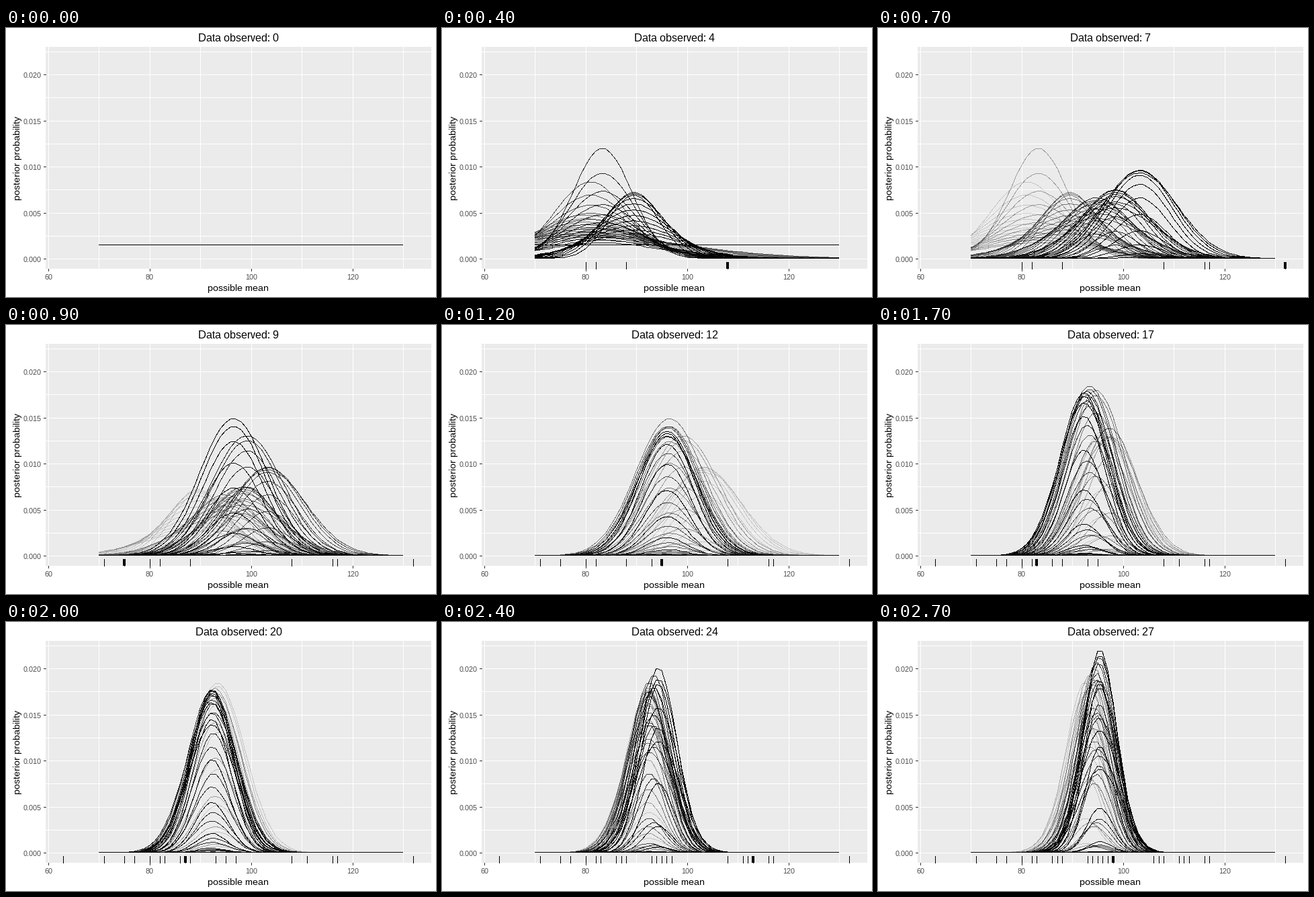
A matplotlib script that plays this animation: 640x400 px, repeating every 2800 ms.

```python
import numpy as np
import matplotlib.pyplot as plt
from matplotlib.animation import FuncAnimation
from matplotlib.collections import LineCollection
from matplotlib.patches import Rectangle

W, H, DPI = 640, 400, 100
PX = 72 / DPI                       # one pixel in points
LEFT, RIGHT, TOP, BOTTOM = 59, 633, 28, 358
FRAMES, INTERVAL = 28, 100
WAKE = 5                            # older posteriors that stay visible

DATA = np.array([80, 82, 88, 108, 116, 117, 132, 71, 75, 93, 95, 111, 63,
                 77, 86, 83, 97, 87, 94, 96, 112, 113, 106, 107, 98])
MEANS = np.arange(70, 131)
SDS = np.arange(10, 21)

plt.rcParams["font.family"] = ["Liberation Sans", "DejaVu Sans"]
plt.rcParams["text.hinting"] = "native"
plt.rcParams["text.hinting_factor"] = 1


def px_x(v):
    return 59.15 + (np.asarray(v) - 59.55) * 7.554


def px_y(p):
    return 343.2 - np.asarray(p) * 13700


def pixel(v):
    """Centre of the pixel that a one-pixel pen at v fills."""
    return np.round(v) - 0.5


def known(step):
    """Number of values in use; two steps bring no new one."""
    return step - (step >= 12) - (step >= 18)


def posterior(n):
    """Joint posterior on the grid, one row per standard deviation."""
    x = DATA[:n]
    sq = ((x[None, :] - MEANS[:, None]) ** 2).sum(axis=1)
    log = -n * np.log(SDS)[:, None] - sq[None, :] / (2 * SDS[:, None] ** 2)
    p = np.exp(log - log.max())
    return p / p.sum()


def stroke(xs, ys):
    """Hard-edged polyline, one pixel wide, as a mask of the stage."""
    mask = np.zeros((H, W), bool)
    for x0, y0, x1, y1 in zip(xs[:-1], ys[:-1], xs[1:], ys[1:]):
        cols = slice(x0 - 1, x1 + 1)
        rows = slice(min(y0, y1) - 1, max(y0, y1) + 1)
        y, x = np.ogrid[rows, cols]
        # The small excess over one half sends ties up and left.
        u, v = x + 0.51 - x0, y + 0.51 - y0
        dx, dy = x1 - x0, y1 - y0
        t = np.clip((u * dx + v * dy) / (dx * dx + dy * dy), 0, 1)
        mask[rows, cols] |= (u - t * dx) ** 2 + (v - t * dy) ** 2 < 0.25
    return mask


def layers(step):
    """How many of the step's curves cover each pixel."""
    xs = np.round(px_x(MEANS)).astype(int)
    ys = np.round(px_y(posterior(known(step)))).astype(int)
    return sum(stroke(xs, row).astype(np.uint8) for row in ys)


LAYERS = [layers(s) for s in range(FRAMES)]

fig = plt.figure(figsize=(W / DPI, H / DPI), dpi=DPI, facecolor="white")
ax = fig.add_axes([0, 0, 1, 1])
ax.axis("off")

ink = np.zeros((H, W, 4))
curves = ax.imshow(ink, extent=(0, W, H, 0), aspect="auto",
                   interpolation="nearest", zorder=5)
ax.set_xlim(0, W)
ax.set_ylim(H, 0)


def lines(segments, color, width=1, **kw):
    group = LineCollection(segments, colors=color, linewidths=width * PX,
                           antialiaseds=False, **kw)
    ax.add_collection(group, autolim=False)
    return group


def label(x, y, text, size, color="black", ha="center", va="baseline", **kw):
    return ax.text(x, y, text, fontsize=size * PX, color=color,
                   ha=ha, va=va, **kw)


def vertical(x, y0, y1):
    return [(x, y0), (x, y1)]


def horizontal(y, x0, x1):
    return [(x0, y), (x1, y)]


# Panel and grid
ax.add_patch(Rectangle((LEFT, TOP), RIGHT - LEFT, BOTTOM - TOP,
                       facecolor="#EBEBEB", edgecolor="none",
                       antialiased=False, zorder=0))
grid_x = pixel(px_x(np.arange(60, 131, 10)))
grid_y = pixel(px_y(np.arange(10) * 0.0025))
lines([vertical(x, TOP, BOTTOM) for x in grid_x]
      + [horizontal(y, LEFT, RIGHT) for y in grid_y], "white", zorder=1)

# Axis ticks and labels
lines([vertical(x, BOTTOM, BOTTOM + 3) for x in grid_x[::2]]
      + [horizontal(y, LEFT - 3, LEFT) for y in grid_y[::2]],
      "#333333", zorder=1)
for x, v in zip(grid_x[::2], range(60, 121, 20)):
    label(x + 0.5, 374, str(v), 11, "#4D4D4D")
for i, y in enumerate(grid_y[::2]):
    label(53, y + 5.5, f"{i * 0.005:.3f}", 11, "#4D4D4D", ha="right")
label(345.5, 391, "possible mean", 14)
label(24.5, 193, "posterior probability", 14, ha="right", va="center",
      rotation=90)
title = label(346, 20, "", 16)

rug = lines([], "black", zorder=6)
newest = lines([], "black", 4, zorder=7)


def draw(step):
    # Black over black: only the light that gets through has to be tracked.
    light = np.ones((H, W))
    for lag in range(min(step, WAKE) + 1):
        light *= (lag / (WAKE + 1)) ** LAYERS[step - lag]
    ink[..., 3] = 1 - light
    curves.set_data(ink)

    xs = pixel(px_x(DATA[:known(step)]))
    rug.set_segments([vertical(x, 348, BOTTOM) for x in xs])
    newest.set_segments([vertical(x + 0.5, 348, BOTTOM) for x in xs[-1:]])
    title.set_text(f"Data observed: {step}")
    return [curves, rug, newest, title]


anim = FuncAnimation(fig, draw, frames=FRAMES, interval=INTERVAL,
                     repeat=True, repeat_delay=0, blit=False)
plt.show()
```
